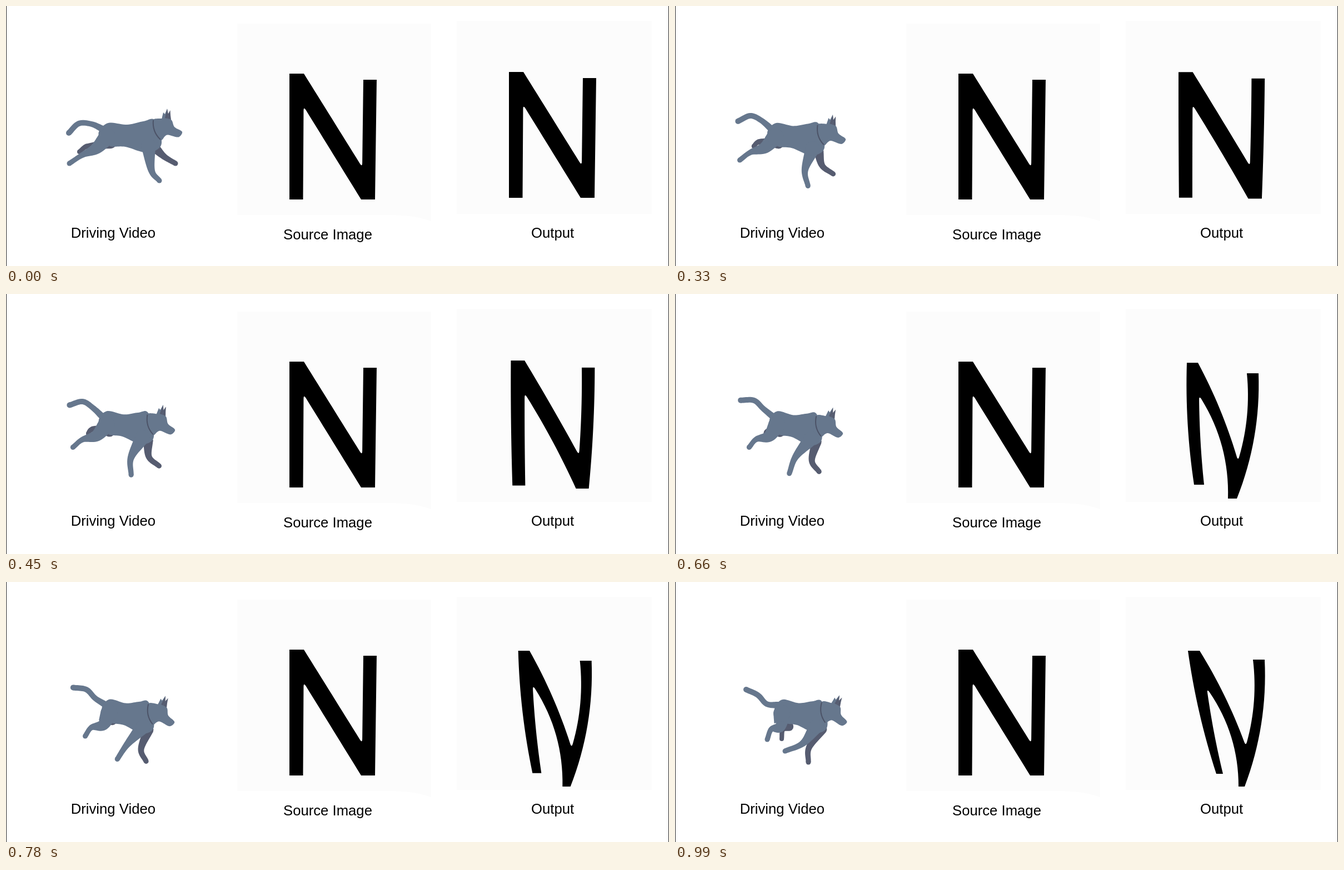
These frames come from a looping animation (1193x469 px, 1080 ms). An HTML page with a canvas:

```html
<!DOCTYPE html>
<html lang="en">
<head>
<meta charset="utf-8">
<title>Motion transfer</title>
<style>
  html, body { margin: 0; width: 100%; height: 100%; overflow: hidden; background: #fff; }
  canvas { display: block; width: 1193px; height: 469px; }
</style>
</head>
<body>
<canvas id="stage" width="1193" height="469"></canvas>
<script>
const ctx = document.getElementById('stage').getContext('2d');

const LOOP = 1080;
const STEPS = [0, 240, 330, 450, 540, 660, 780, 870, 990]; // each pose is held until the next
const COAT = '#66778d', SHADE = '#565c70', PANEL = '#fcfcfc';

const mix = (a, b, t) => a + (b - a) * t;
const mixAll = (a, b, t) => a.map((v, i) => mix(v, b[i], t));

// Parabola from a through m at half time to b.
const arc = (a, m, b, t) =>
  a.map((v, i) => v * (1 - t) * (1 - 2 * t) + m[i] * 4 * t * (1 - t) + b[i] * t * (2 * t - 1));

// Outlines at rest; the torso is relative to the rump, the skull to the neck.
const TORSO = [[3, 1], [20, -15], [54, -12], [83, -18], [104, -20], [116, 17],
               [108, 33], [85, 38], [51, 28], [24, 27], [8, 16]];
const SKULL = [[-9, -16], [9, -19], [25, -17], [31, -4], [43, 3], [45, 7], [41, 13],
               [35, 14.5], [20, 10.5], [14, 13], [8, 20], [-3, 24], [-9, 4]];

// Each limb hangs from a point of the torso; its joints swing from, through and to.
const TAIL = {
  root: [10, -4], widths: [12, 10, 10, 10], color: COAT,
  joints: [[[154, 213], [157, 205], [165, 220]],
           [[131, 212], [140, 192], [149, 204]],
           [[113, 229], [116, 195], [128, 194]]]
};
const NEAR_HIND = {
  root: [18, 10], widths: [30, 21, 10, 9], color: COAT,
  joints: [[[162, 257], [165, 256], [188, 261]],
           [[137, 269], [141, 262], [173, 266]],
           [[114, 284], [126, 276], [166, 284]]]
};
const FAR_HIND = {
  root: [25, 22], widths: [18, 12, 9, 8], color: SHADE,
  joints: [[[152, 253], [168, 244], [207, 262]],
           [[143, 254], [158, 246], [194, 266]],
           [[132, 263], [155, 253], [192, 283]]]
};
const NEAR_FRONT = {
  root: [92, 26], widths: [26, 12, 9], color: COAT,
  joints: [[[262, 297], [219, 295], [230, 291]],
           [[276, 315], [214, 326], [198, 305]]]
};
const FAR_FRONT = {
  root: [104, 30], widths: [18, 11, 9], color: SHADE,
  joints: [[[285, 272], [251, 298], [241, 299]],
           [[305, 284], [267, 316], [240, 325]]]
};

// Letter corners, clockwise from the top left: straight, folded, leaning.
const STRAIGHT = [[905, 119], [931, 119], [1036, 288], [1038, 130], [1062, 130],
                  [1059, 346], [1034, 346], [930.5, 178], [929.5, 346], [905, 346]];
const FOLDED = [[921, 124], [941, 124], [1013, 301], [1029, 143], [1050, 143],
                [1011, 369], [995, 369], [943, 183], [952, 344], [934, 344]];
const LEANING = [[923, 124], [944, 124], [1027, 296], [1040, 140], [1061, 140],
                 [1025, 369], [1014, 369], [957, 192], [986, 346], [974, 346]];
const BULGE = [0, 5, 8, 0, 12, 0, 15, -2, 0, -5]; // sideways, per edge when folded
const NOTCHES = [2, 7];
const FOLD_AT = 5 / 8;

function catmull(a, b, c, d, t) {
  return b + 0.5 * t * (c - a + t * (2 * a - 5 * b + 4 * c - d + t * (3 * (b - c) + d - a)));
}

// Samples a smooth curve through points of any dimension.
function spline(pts, closed) {
  const n = pts.length, out = [];
  const at = i => closed ? pts[(i + n) % n]
    : i < 0 ? mixAll(pts[1], pts[0], 2)
    : i >= n ? mixAll(pts[n - 2], pts[n - 1], 2)
    : pts[i];
  for (let i = 0; i < (closed ? n : n - 1); i++) {
    for (let k = 0; k < 10; k++) {
      out.push(at(i).map((v, j) => catmull(at(i - 1)[j], v, at(i + 1)[j], at(i + 2)[j], k / 10)));
    }
  }
  if (!closed) out.push(pts[n - 1]);
  return out;
}

function fillPoly(pts, color) {
  ctx.fillStyle = color;
  ctx.beginPath();
  pts.forEach(([x, y]) => ctx.lineTo(x, y));
  ctx.fill();
}

function disc([x, y, width]) {
  ctx.beginPath();
  ctx.arc(x, y, width / 2, 0, 2 * Math.PI);
  ctx.fill();
}

// The torso moves with the rump, shortens and tips forward.
function torsoMap(t) {
  const [x0, y0, stretch, slope] = arc([164, 226, 1, 0], [166, 224, 0.85, 0.11], [177, 225, 0.84, 0.1], t);
  return ([x, y]) => [x0 + x * stretch, y0 + y + x * slope];
}

function drawLimb({ root, joints, widths, color }, place, t) {
  const pts = [place(root), ...joints.map(([a, m, b]) => arc(a, m, b, t))];
  const path = spline(pts.map((q, i) => [...q, widths[i]]));
  const left = [], right = [];
  path.forEach(([x, y, w], i) => {
    const a = path[Math.max(0, i - 1)], b = path[Math.min(path.length - 1, i + 1)];
    const dx = b[0] - a[0], dy = b[1] - a[1], s = w / 2 / (Math.hypot(dx, dy) || 1);
    left.push([x - dy * s, y + dx * s]);
    right.unshift([x + dy * s, y - dx * s]);
  });
  fillPoly(left.concat(right), color);
  disc(path[0]);
  disc(path[path.length - 1]);
}

function atNeck(t, turn, paint) {
  const [x, y, tilt] = arc([272, 222, 0], [259, 236, 0.17], [268, 234, 0.3], t);
  ctx.save();
  ctx.translate(x, y);
  ctx.rotate(tilt * turn);
  paint();
  ctx.restore();
}

function paintHead() {
  fillPoly([[14, -17], [23.5, -34], [24, -25], [25, -17]], SHADE);
  fillPoly([[8, -18], [11, -30], [14, -27], [18, -37], [20, -26], [18, -17]], COAT);
  fillPoly([[14, -20], [18, -36], [20, -26], [18, -19]], SHADE);
  fillPoly(spline(SKULL, true), COAT);
}

function paintCollar() {
  ctx.strokeStyle = '#4c5367';
  ctx.lineWidth = 2;
  ctx.beginPath();
  ctx.moveTo(-7, -16);
  ctx.quadraticCurveTo(-9, 5, 6, 19);
  ctx.stroke();
}

function drawDog(t) {
  const place = torsoMap(t);
  [FAR_HIND, FAR_FRONT, TAIL].forEach(limb => drawLimb(limb, place, t));
  fillPoly(spline(TORSO.map(place), true), COAT);
  atNeck(t, 1, paintHead);
  [NEAR_HIND, NEAR_FRONT].forEach(limb => drawLimb(limb, place, t));
  atNeck(t, 0.6, paintCollar);
}

// The letter folds slowly at first, then leans at an even pace.
function drawLetter(t) {
  const fold = Math.min(1, t / FOLD_AT) ** 3;
  const lean = Math.max(0, (t - FOLD_AT) / (1 - FOLD_AT));
  const pts = STRAIGHT.map((q, i) => mixAll(mixAll(q, FOLDED[i], fold), LEANING[i], lean));
  ctx.save();
  ctx.filter = 'blur(0.6px)';
  ctx.fillStyle = '#000';
  ctx.beginPath();
  pts.forEach((a, i) => {
    const j = (i + 1) % pts.length, b = pts[j];
    const dx = b[0] - a[0], dy = b[1] - a[1], len = Math.hypot(dx, dy);
    const bend = 2 * BULGE[i] * fold / len;
    const mid = [(a[0] + b[0]) / 2 + Math.abs(dy) * bend, (a[1] + b[1]) / 2 - dx * Math.sign(dy) * bend];
    const start = NOTCHES.includes(i) ? 8 / len : 0;
    const end = NOTCHES.includes(j) ? 1 - 8 / len : 1;
    for (let k = 0; k <= 16; k++) {
      const s = mix(start, end, k / 16);
      const [x, y] = mixAll(mixAll(a, mid, s), mixAll(mid, b, s), s);
      if (k === 0 && start) ctx.quadraticCurveTo(...a, x, y);
      else ctx.lineTo(x, y);
    }
  });
  ctx.fill();
  ctx.restore();
}

function drawPanels() {
  ctx.fillStyle = PANEL;
  ctx.fillRect(811, 27, 351, 348);
  ctx.beginPath();
  ctx.moveTo(416, 32);
  ctx.lineTo(765, 32);
  ctx.lineTo(765, 388);
  ctx.quadraticCurveTo(735, 377, 690, 377);
  ctx.lineTo(416, 377);
  ctx.fill();
}

function drawLabels() {
  ctx.fillStyle = '#000';
  ctx.font = '25.7px "Liberation Sans", Arial, sans-serif';
  ctx.fillText('Driving Video', 116.7, 418);
  ctx.fillText('Source Image', 499, 420.5);
  ctx.fillText('Output', 945, 418);
}

function draw(now) {
  const time = now % LOOP;
  const t = STEPS.findLastIndex(start => start <= time) / (STEPS.length - 1);
  ctx.fillStyle = '#fff';
  ctx.fillRect(0, 0, 1193, 469);
  drawPanels();
  drawDog(t);
  drawLetter(t);
  ctx.save();
  ctx.translate(-395, 3);
  drawLetter(0);
  ctx.restore();
  drawLabels();
  ctx.fillStyle = '#2a2a2a';
  ctx.fillRect(0, 0, 1, 469);
  ctx.fillRect(1192, 0, 1, 469);
}

let origin;
function tick(now) {
  origin ??= now;
  draw(now - origin);
  requestAnimationFrame(tick);
}
draw(0);
requestAnimationFrame(tick);
</script>
</body>
</html>
```
